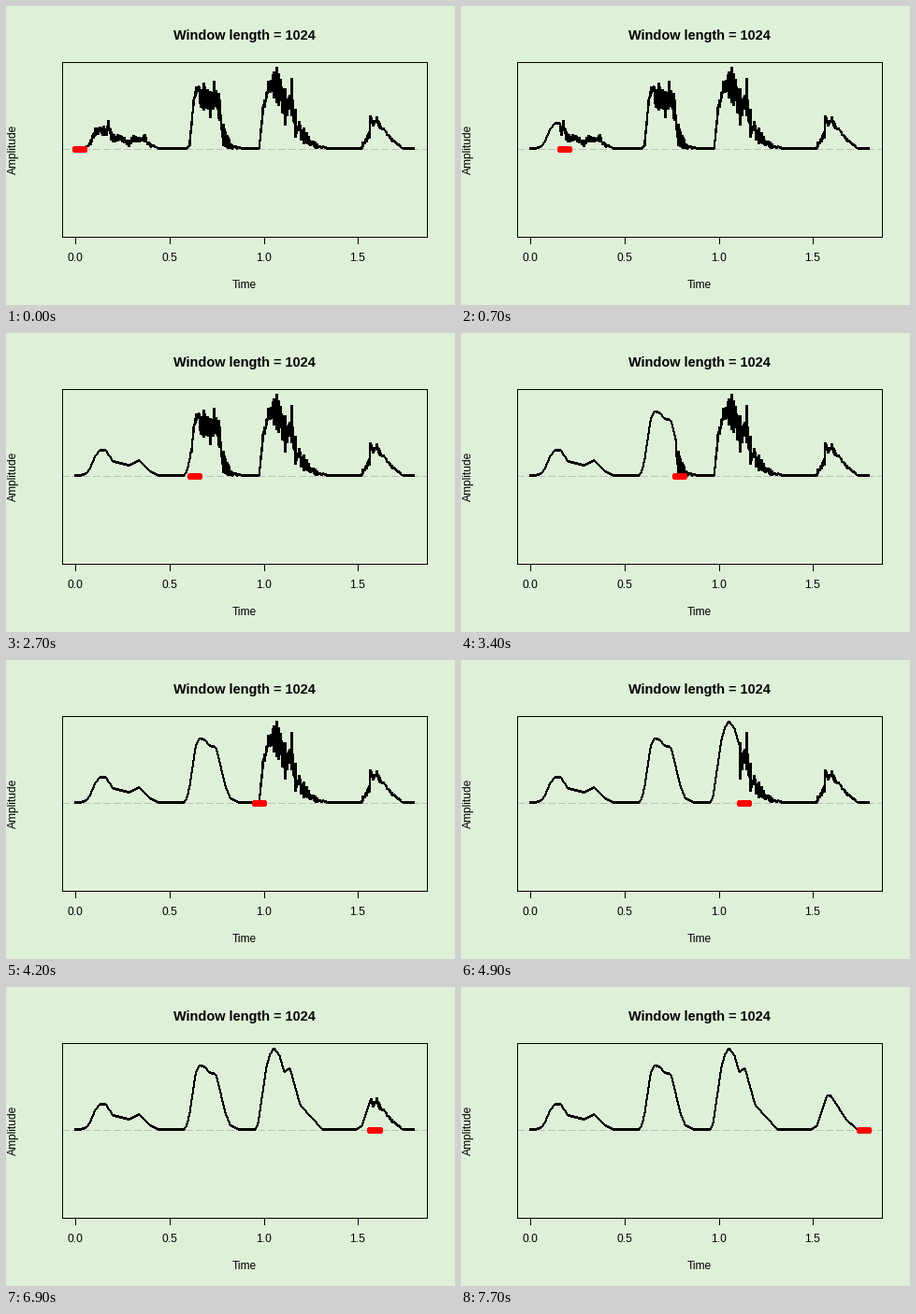
A matplotlib script for the animation above (7800 ms loop, 480 px wide and 320 px high).

```python
import numpy as np
import matplotlib.pyplot as plt
from matplotlib.animation import FuncAnimation

W, H = 480, 320
FRAMES, LOOP = 78, 7800
BG = "#dff0d8"
LEFT, RIGHT, TOP, BOTTOM, ZERO = 59, 449, 59, 246, 152
RATE, LENGTH, SAMPLES = 22050, 1024, 39578
DURATION = SAMPLES / RATE
SCALE = 390.72 / (1.08 * DURATION)      # pixels per second
X0 = 59.04 + 0.04 * DURATION * SCALE
WINDOW = LENGTH / RATE * SCALE
STEP = (DURATION * SCALE - WINDOW) / (FRAMES - 1)

# Upper edge of the raw envelope
EDGE = [
    (84, 152), (90, 143), (95, 130), (104, 128), (107, 131), (109, 122),
    (112, 134), (126, 140), (131, 143), (136, 138), (148, 137), (154, 147),
    (164, 152),
    (193, 152), (196, 143), (200, 100), (203, 86), (211, 82), (218, 91),
    (222, 80), (227, 93), (232, 126), (241, 148), (254, 152),
    (270, 152), (274, 108), (280, 80), (289, 65), (298, 88), (305, 77),
    (309, 110), (318, 130), (332, 147), (344, 152),
    (377, 152), (388, 134), (389, 117), (392, 122), (396, 118), (399, 125),
    (412, 141), (424, 152),
]
# How far the noise reaches below that edge
DEPTH = [
    (84, 1), (92, 7), (105, 10), (109, 5), (114, 11), (124, 6), (148, 8),
    (157, 1), (205, 7), (208, 30), (230, 26), (245, 2), (270, 5), (280, 12),
    (289, 38), (305, 40), (313, 21), (340, 1), (388, 7), (420, 1),
]
# Smoothed envelope
SMOOTH = [
    (79, 152), (85, 150), (89, 145), (95, 131), (100, 125), (106, 125),
    (114, 137), (131, 141), (142, 136), (153, 147), (162, 152),
    (190, 152), (193, 147), (196, 134), (202, 93), (206, 83), (212, 85),
    (217, 91), (224, 93), (234, 134), (239, 147), (248, 152),
    (266, 152), (269, 146), (278, 84), (282, 71), (286, 65), (292, 73),
    (297, 91), (303, 86), (314, 126), (338, 152),
    (374, 152), (380, 148), (391, 115), (395, 116), (411, 141), (423, 152),
]

rng = np.random.default_rng(7)
cols = np.arange(round(X0), round(X0 + DURATION * SCALE) + 1)


def trace(points):
    return np.interp(cols, *np.array(points).T)


def rough_curve():
    """Two levels per pixel column, scattered below the edge."""
    mix = rng.random((len(cols), 2))
    mix[[x - cols[0] for x, _ in EDGE]] = 0, 1
    y = trace(EDGE)[:, None] + trace(DEPTH)[:, None] * mix
    return np.round(np.minimum(y, ZERO))


def smooth_curve():
    y = np.pad(trace(SMOOTH), 1, mode="edge")
    return np.round(np.convolve(y, [0.2, 0.6, 0.2], "valid"))


rough, smooth = rough_curve(), smooth_curve()
xs = np.repeat(cols, 2)

plt.rcParams["font.family"] = "Liberation Sans"
fig = plt.figure(figsize=(W / 72, H / 72), dpi=72, facecolor=BG)
ax = fig.add_axes([0, 0, 1, 1])
ax.set(xlim=(-0.5, W - 0.5), ylim=(H - 0.5, -0.5))
ax.axis("off")


def line(x, y, color="black", width=1, **kw):
    return ax.plot(x, y, color=color, lw=width, antialiased=False, **kw)[0]


def label(x, y, text, size=12, **kw):
    kw = {"ha": "center", "va": "baseline", **kw}
    ax.text(x, y, text, fontsize=size, **kw)


line([LEFT, RIGHT], [ZERO, ZERO], "#bebebe", dashes=(7, 3),
     dash_capstyle="butt")
wave = line([], [], width=1.1, solid_joinstyle="miter")
line([LEFT, RIGHT, RIGHT, LEFT, LEFT], [TOP, TOP, BOTTOM, BOTTOM, TOP],
     solid_joinstyle="miter")
for t in (0, 0.5, 1, 1.5):
    x = round(X0 + t * SCALE - 0.5)
    line([x, x], [BOTTOM, BOTTOM + 7])
    label(x, 272.5, f"{t:.1f}")
label(254, 35.5, "Window length = 1024", 14.5, weight="bold")
label(254, 301.5, "Time")
label(13, 152.5, "Amplitude", rotation=90, ha="right", va="center")
bar = line([], [], "red", 7, solid_capstyle="round")


def draw(i):
    start = X0 + i * STEP
    done = cols <= start
    wave.set_data(xs, np.where(done[:, None], smooth[:, None], rough).ravel())
    bar.set_data([start - 0.5, start + WINDOW - 0.5], [ZERO, ZERO])
    return wave, bar


anim = FuncAnimation(fig, draw, frames=FRAMES, interval=LOOP / FRAMES,
                     repeat=True, repeat_delay=0)
plt.show()
```
